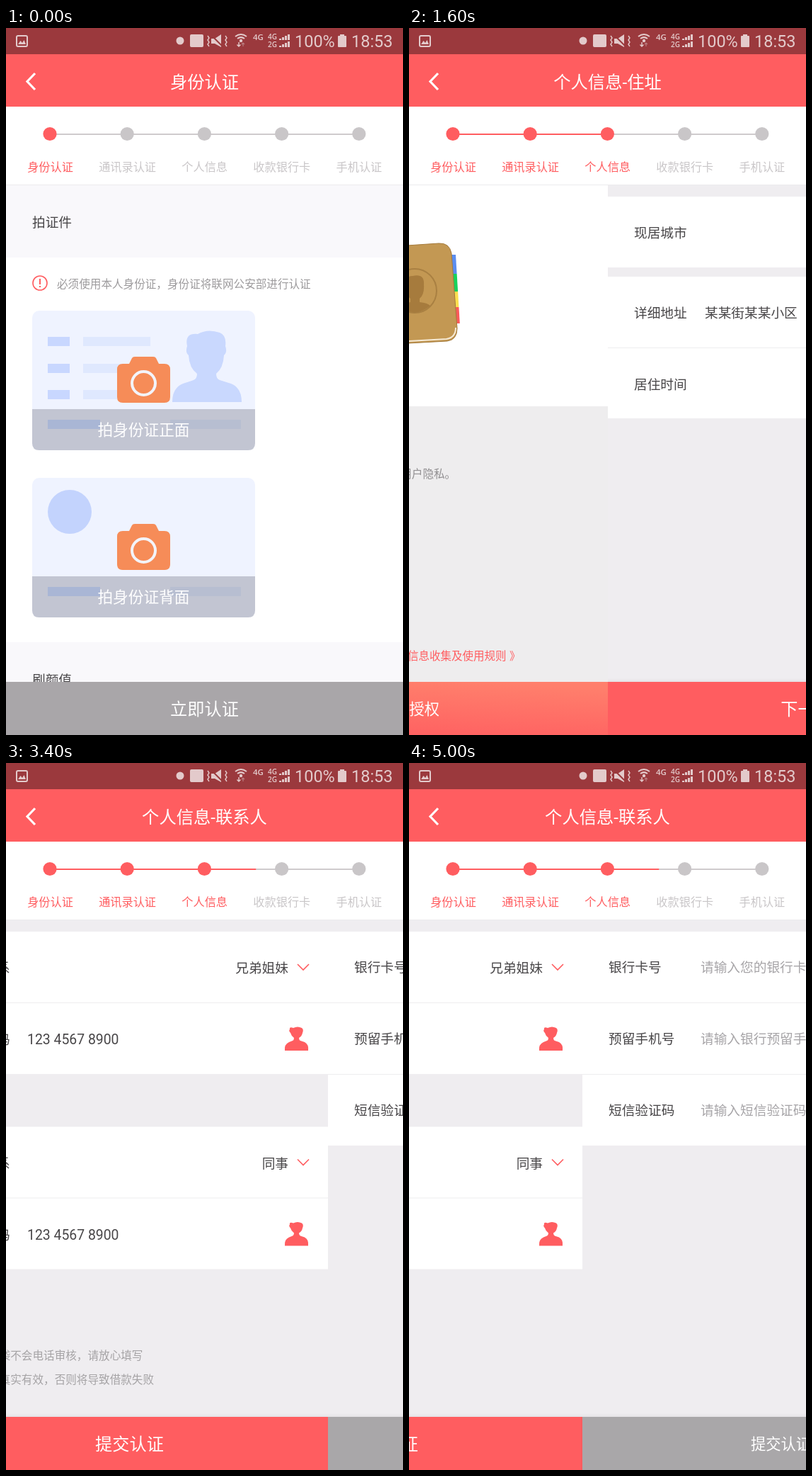
These frames come from a looping animation (561 by 998 pixels, 5.1 s). An HTML page:

```html
<!DOCTYPE html>
<html lang="zh-CN">
<head>
<meta charset="utf-8">
<title>身份认证</title>
<style>
html, body { margin: 0; width: 100%; height: 100%; overflow: hidden; background: #fff; }
svg { display: block; width: 100vw; height: 100vh; font-family: Roboto, "Noto Sans CJK SC", "Noto Sans CJK", sans-serif; }
.mid { font-family: "Noto Sans CJK TC", "Noto Sans CJK", sans-serif; }
</style>
</head>
<body>
<svg id="stage" viewBox="0 0 561 998"></svg>
<script>
const W = 561, LOOP = 5100, STEP = 100;
const RED = '#ff5d60', BG = '#efedf0', INK = '#484648', HINT = '#a7a5a8', TIP = '#a5a3a5', DONE_GREY = '#c9c6c8';

// ---- drawing helpers ----
const rect = (x, y, w, h, fill, rx = 0) => `<rect x="${x}" y="${y}" width="${w}" height="${h}" fill="${fill}" rx="${rx}"/>`;
const path = (d, fill, stroke = 'none', width = 0) => `<path d="${d}" fill="${fill}" stroke="${stroke}" stroke-width="${width}"/>`;
const circle = (x, y, r, fill, extra = '') => `<circle cx="${x}" cy="${y}" r="${r}" fill="${fill}" ${extra}/>`;
const group = (x, y, body) => `<g transform="translate(${x} ${y})">${body}</g>`;

// Text is placed by the vertical middle of its glyphs.
function text(x, middle, str, size = 18.7, fill = INK, anchor = 'start') {
  const body = str.replace(/[，：]/g, '<tspan class="mid">$&</tspan>');
  return `<text x="${x}" y="${(middle + size * 0.38).toFixed(1)}" font-size="${size}" fill="${fill}" text-anchor="${anchor}">${body}</text>`;
}

const chevronDown = y => path(`M518 ${y - 5} L526 ${y + 3} L534 ${y - 5}`, 'none', RED, 1.6);
const chevronRight = y => path(`M526 ${y - 9} L534 ${y} L526 ${y + 9}`, 'none', RED, 1.6);
const panel = (y1, y2, ...dividers) =>
  rect(0, y1, W, y2 - y1, '#fff') + dividers.map(y => rect(0, y, W, 1, '#eeedef')).join('');
const tips = (x, rows, lines, fill) => lines.map((s, i) => text(x, rows[i], s, 15.6, fill)).join('');

function button(label, size, fill = RED) {
  return rect(0, 918, W, 5, 'url(#lift)') + rect(0, 923, W, 75, fill) +
    text(280.5, 961, label, size, '#fff', 'middle');
}

// ---- pages ----
const camera = path('M165 474 H174 L178 466 Q179 464 182 464 H208 Q211 464 212 466 L216 474 H224 Q232 474 232 482 V521 Q232 529 224 529 H165 Q157 529 157 521 V482 Q157 474 165 474Z', '#f68c58') +
  circle(194.5, 501.5, 16.5, 'none', 'stroke="#f3f4fc" stroke-width="4"');

const idCard = (art, label) => rect(37, 399, 315, 197, '#eff3ff', 10) + art +
  path('M37 538 H352 V586 Q352 596 342 596 H47 Q37 596 37 586Z', '#c2c5d2') +
  rect(59, 553, 74, 13, '#a9b6d5') + rect(232, 553, 100, 13, '#b7bed1') +
  camera + text(194.5, 567, label, 21.7, '#fff', 'middle');

const frontArt = [436, 474, 511].map((y, i) =>
  rect(59, y, 31, 13, '#c8d7ff') + rect(109, y, i ? 62 : 95, 13, '#dfe8fe')).join('') +
  path('M235 528 Q235 508 250 502 L265 497 Q270 495 270 488 Q259 480 258 462 Q253 458 256 449 Q252 430 271 432 Q285 424 302 430 Q312 434 310 449 Q313 458 308 462 Q307 480 297 488 Q297 495 302 497 L318 502 Q333 508 333 528Z', '#c9d8fe');

const identity = () => rect(0, 222, W, 701, '#fff') + rect(0, 222, W, 102, '#f9f8fb') + rect(0, 867, W, 56, '#f9f8fb') +
  text(37, 274, '拍证件') +
  circle(48, 360, 10, 'none', `stroke="${RED}" stroke-width="1.6"`) + rect(47, 354, 2, 8, RED) + rect(47, 364, 2, 2, RED) +
  text(72, 361, '必须使用本人身份证，身份证将联网公安部进行认证', 15.6, '#9c9a9c') +
  idCard(frontArt, '拍身份证正面') +
  group(0, 236, idCard(circle(90, 447, 31, '#c3d3fd'), '拍身份证背面')) +
  text(37, 920, '刷颜值') +
  rect(0, 923, W, 75, '#a9a6a9') + text(280.5, 961, '立即认证', 24.2, '#fff', 'middle');

const tab = (a, b, fill) => {
  const left = y => 384 + (y - 320) * 0.06;
  return path(`M${left(a)} ${a} H${left(a) + 8} L${left(b) + 8} ${b} H${left(b)}Z`, fill);
};
const book = tab(320, 347, '#5b8def') + tab(347, 372, '#16d25c') + tab(372, 394, '#fbe04f') + tab(394, 417, '#fb5a5a') +
  path('M275 314 Q275 310 279 310 L368 304 Q383 303 386 318 L394 424 Q394 440 380 442 L289 447 Q283 447 282 441Z', '#c39853', '#a47a3b', 1) +
  path('M277 312 L284 446', 'none', '#a47a3b', 4) + path('M282 311 L290 445', 'none', '#b0843f', 1) +
  path('M289 444 L379 439 Q392 437 392 423', 'none', '#f6ead5', 2) +
  circle(334, 371, 31, 'none', 'stroke="#a98042" stroke-width="2"') +
  path('M314 394 Q318 389 328 387 V382 Q321 376 322 366 Q319 350 331 350 Q348 346 347 362 Q348 376 341 382 V387 Q352 388 356 392 Q335 410 314 394Z', '#a67b3d') +
  rect(254, 383, 58, 40, '#f0eff0', 4) + path('M285 379 L289 375 L293 379Z', '#fff') + rect(259, 378, 58, 40, '#fff', 4) +
  [264, 272, 279].map(x => rect(x, 383, 5, 5, '#8f8d8f', 1)).join('') +
  [[269, 23], [276, 23], [269, 11]].map(([x, w], i) =>
    rect(x, 393 + i * 8, 285 - x, 3, '#d8d6d8') + rect(287, 393 + i * 8, w, 3, '#8f8d8f')).join('');

const contacts = () => rect(0, 222, W, 312, '#fff') + rect(0, 534, W, 389, '#eeedee') + group(-46, 0, book) +
  tips(37, [568, 599, 629], ['小贴士：', '1.请使用您本人的手机授权。', '2.暖橙钱袋将严格遵循协议，保护用户隐私。'], '#918f91') +
  rect(36, 875, 23, 22, RED, 3) + path('M42 886 L46.500 890.500 L54 882', 'none', '#fff', 2.4) +
  text(71, 886, '我同意', 15.6) +
  [[115, '《'], [134, '通讯录授权协议'], [246, '》'], [258, '《'], [278, '信息收集及使用规则'], [422, '》']]
    .map(([x, s]) => text(x, 886, s, 15.5, RED)).join('') +
  rect(0, 923, W, 75, 'url(#warm)') + text(280.5, 961, '马上授权', 21.2, '#fff', 'middle');

const address = () => panel(238, 338) + panel(351, 551, 451) +
  text(37, 289, '现居城市') + text(512, 289, '北京市-县-密云县', 18.7, INK, 'end') + chevronRight(288) +
  text(37, 402, '详细地址') + text(137, 402, '某某街某某小区') +
  text(37, 503, '居住时间') + text(505, 503, '1-3个月', 18.7, INK, 'end') + chevronDown(502) +
  button('下一步', 24.2);

const job = () => panel(238, 338) + panel(351, 753, 451, 552, 653) +
  ['当前职业', '每月收入', '现单位名称', '现单位地址', '现单位电话']
    .map((s, i) => text(37, i ? 301 + i * 100.7 : 289, s)).join('') +
  text(505, 289, '服务员', 18.7, INK, 'end') + chevronDown(289) +
  text(505, 402, '小于1000元', 18.7, INK, 'end') + chevronDown(401) +
  text(167, 503, '某某小餐馆') +
  text(512, 603, '山西省-晋城市-陵川县', 18.7, INK, 'end') + chevronRight(602) +
  text(167, 704, '12345678900', 19.4) +
  tips(37, [841, 875, 909], ['小贴士：', '1.信息仅供审核，不会与您所在单位联系', '2.请您根据实际情况如实填写'], TIP) +
  button('下一步', 24.2);

const person = path('M500 406 Q499 397 506 394 L511 392 Q513 391 513 388 Q509 385 508 381 Q505 378 507 376 Q506 372 512 374 Q518 371 524 374 Q527 376 525 381 Q524 386 520 388 Q520 391 522 392 L528 394 Q534 397 533 406Z', RED);
const relative = (label, value) => panel(238, 439, 338) +
  text(37, 289, label) + text(505, 289, value, 18.7, INK, 'end') + chevronDown(289) +
  text(37, 390, '电话号码') + text(136, 390, '123 4567 8900', 19.4) + person;

const people = () => relative('亲属关系', '兄弟姐妹') + group(0, 275.5, relative('社会关系', '同事')) +
  tips(37, [802, 836, 870], ['小贴士：', '1.暖橙钱袋不会电话审核，请放心填写', '2.信息需真实有效，否则将导致借款失败'], TIP) +
  button('提交认证', 24.2);

const bank = () => panel(238, 540, 338, 439) +
  [['银行卡号', '请输入您的银行卡号'], ['预留手机号', '请输入银行预留手机号'], ['短信验证码', '请输入短信验证码']]
    .map(([label, hint], i) => text(37, 288 + i * 101, label) + text(167, 288 + i * 101, hint, 18.7, HINT)).join('') +
  rect(430, 460, 112, 62, '#e8e6e9', 31) + text(486, 491.5, '获取验证码', 15, HINT, 'middle') +
  button('提交认证', 21.3, '#a9a7a9');

const PAGES = [identity, contacts, address, job, people, bank];
const TITLES = ['身份认证', '通讯录认证', '个人信息-住址', '个人信息-单位', '个人信息-联系人', '收款银行卡'];
const STEPS = ['身份认证', '通讯录认证', '个人信息', '收款银行卡', '手机认证'];
const PROGRESS = [0, 1, 2, 2 + 1 / 3, 2 + 2 / 3, 3];

// ---- header ----
function statusBar() {
  const c = '#e3cacb';
  const small = (x, y, s, size) => `<text x="${x}" y="${y}" font-size="${size}" font-weight="600" font-family="Open Sans, sans-serif" fill="${c}">${s}</text>`;
  const big = (x, s) => `<text x="${x}" y="27" font-size="23.5" fill="${c}">${s}</text>`;
  const bars = y => [0, 1, 2, 3].map(i => rect(386 + i * 4, y - 2 - i * 2, 3, 2 + i * 2, c)).join('');
  const buzz = x => path(`M${x} 11 l2 3 l-2 3 l2 3 l-2 3 l2 3`, 'none', c, 1.4);
  const arc = r => path(`M${332 - r} ${20 - r} Q332 ${20 - r * 1.75} ${332 + r} ${20 - r}`, 'none', c, 2);
  return rect(0, 0, W, 37, '#9b393d') +
    `<rect x="15" y="11" width="15" height="15" rx="2" fill="none" stroke="${c}" stroke-width="2"/>` +
    path('M17 23 L20.500 18 L23 21 L25.500 17 L28 23Z', c) +
    circle(246, 18, 5.5, c) + rect(260, 9, 19, 18, c, 2) +
    buzz(285) + buzz(310) + path('M290 15 H295 L304 9 V27 L295 22 H290Z', c) + path('M290 10 L307 27', 'none', '#9b393d', 2) +
    arc(8) + arc(5) + circle(332, 18, 2.2, c) + path('M329 20 V26 M326.500 23.500 L329 26 L331.500 23.500', 'none', c, 1.4) +
    path('M335 26 V21 M333 23 L335 21 L337 23', 'none', '#b97b7e', 1.2) +
    small(349, 17, '4G', 11.5) + small(370, 16, '4G', 10) + small(370, 27, '2G', 10) + bars(17) + bars(27) +
    big(408, '100%') + rect(472, 9, 6, 3, c) + rect(469, 11, 12, 16, c, 1) + big(488, '18:53');
}

const header = statusBar() + rect(0, 37, W, 74, RED) +
  path('M41 64 L30 75.500 L41 87', 'none', '#fff', 3.2) +
  text(280.5, 76, ' ', 24.3, '#fff', 'middle').replace('<text', '<text id="title"') +
  rect(0, 111, W, 111, '#fff') + rect(0, 221, W, 1, '#ecebed') +
  rect(62, 149, 437, 2, '#cfcbcd') + '<rect id="line" x="62" y="149" height="2" fill="' + RED + '"/>' +
  STEPS.map((s, i) => `<g class="step">${circle(62 + i * 109.2, 149.500, 9.6, 'currentColor')}${text(62.5 + i * 109.1, 196, s, 16.2, 'currentColor', 'middle')}</g>`).join('');

const stage = document.getElementById('stage');
stage.innerHTML = `<defs>
  <linearGradient id="warm" x1="0.3" y1="1" x2="0.6" y2="0"><stop offset="0" stop-color="#ff6061"/><stop offset="1" stop-color="#ff7f6c"/></linearGradient>
  <linearGradient id="lift" x1="0" y1="0" x2="0" y2="1"><stop offset="0" stop-color="#efedf0"/><stop offset="1" stop-color="#e5e3e6"/></linearGradient>
</defs>` + rect(0, 0, W, 998, BG) +
  PAGES.map(draw => `<g class="page">${rect(0, 222, W, 776, BG)}${draw()}</g>`).join('') + header;

const pages = [...stage.querySelectorAll('.page')];
const steps = [...stage.querySelectorAll('.step')];
const title = document.getElementById('title');
const line = document.getElementById('line');

// ---- motion ----
const SLIDES = [865, 1490, 2121, 2749, 3365];
const SLIDE_TIME = 850, TITLE_DELAY = 45, DRAG_START = 4750, DRAG_SELECT = 5000;
const easeOut = t => 1 - Math.pow(1 - Math.min(1, t), 5);

function position(t) {
  if (t > DRAG_START) return 5 - 0.4367 * ((t - DRAG_START) / 250) ** 2;
  const index = SLIDES.filter(s => s <= t).length;
  return index ? index - 1 + easeOut((t - SLIDES[index - 1]) / SLIDE_TIME) : 0;
}

function render(ms) {
  const t = Math.floor(ms / STEP) * STEP;
  const pos = position(t);
  pages.forEach((page, i) => {
    const x = Math.round((i - pos) * W);
    page.setAttribute('transform', `translate(${x} 0)`);
    page.setAttribute('visibility', Math.abs(x) < W ? 'visible' : 'hidden');
  });
  const selected = t >= DRAG_SELECT ? 4 : SLIDES.filter(s => s + TITLE_DELAY <= t).length;
  title.textContent = TITLES[selected];
  line.setAttribute('width', PROGRESS[selected] * 109.2);
  steps.forEach((step, i) => step.setAttribute('color', i <= PROGRESS[selected] ? RED : DONE_GREY));
}

const start = performance.now();
function frame() {
  render((performance.now() - start) % LOOP);
  requestAnimationFrame(frame);
}
frame();
</script>
</body>
</html>
```
